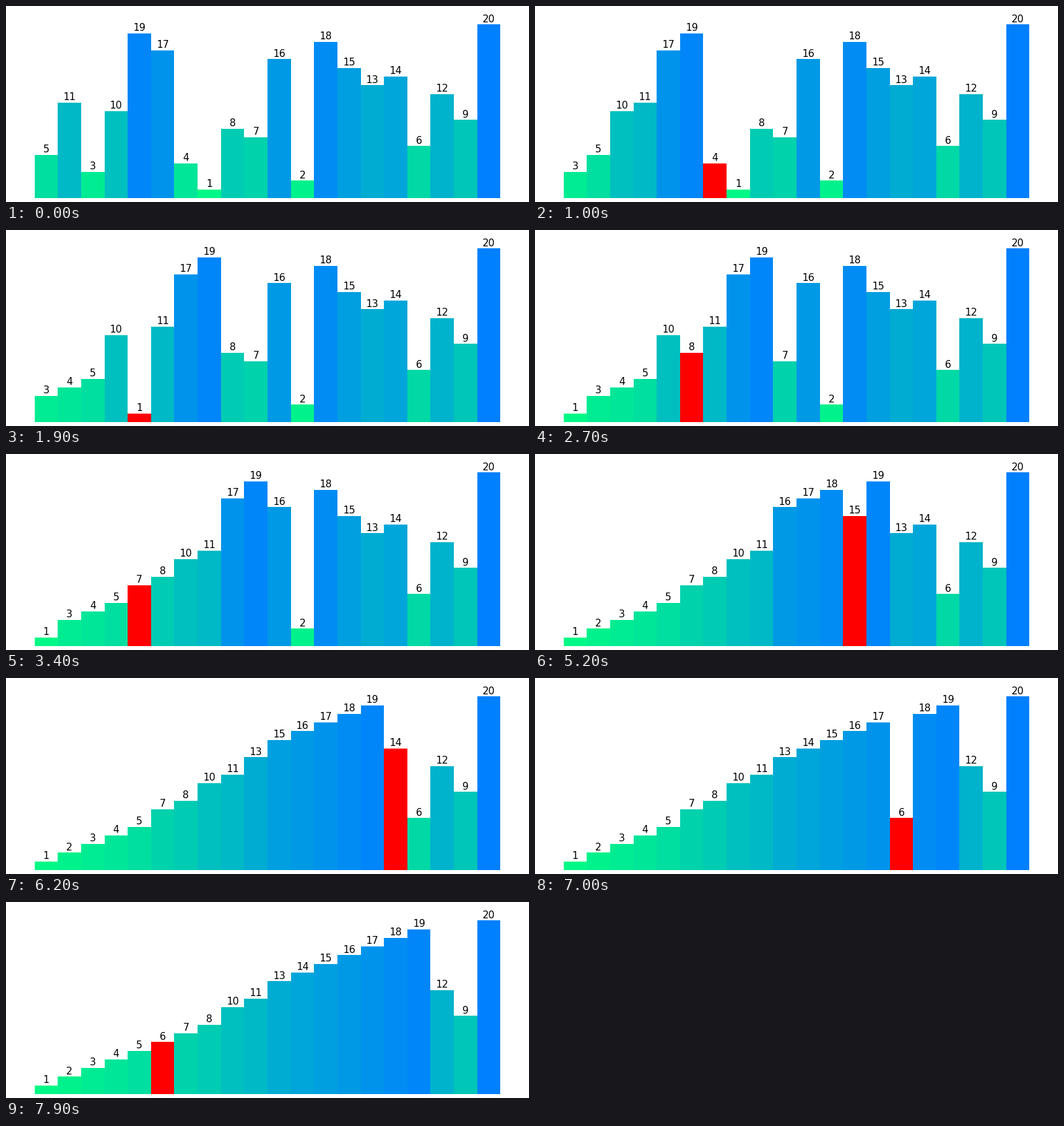
These frames come from a looping animation (800 px wide and 300 px high, 8 s). A matplotlib script:

```python
import matplotlib.pyplot as plt
from matplotlib.animation import FuncAnimation

START = [5, 11, 3, 10, 19, 17, 4, 1, 8, 7, 16, 2, 18, 15, 13, 14, 6, 12, 9, 20]
COUNT = len(START)
FRAMES = 80
INTERVAL = 100
LABEL_GAP = 0.05


def insertion_sort(values):
    """Yield (order, index of the moving bar) for every step."""
    order = list(values)
    yield list(order), None
    for i in range(1, len(order)):
        j = i
        yield list(order), j
        while j > 0 and order[j - 1] > order[j]:
            order[j - 1], order[j] = order[j], order[j - 1]
            j -= 1
            yield list(order), j


def shade(value):
    """Blend from spring green (low) to azure (high)."""
    half = value / COUNT / 2
    return (0, 1 - half, 0.5 + half)


steps = list(insertion_sort(START))[:FRAMES]

fig, ax = plt.subplots(figsize=(8, 3), dpi=100)
fig.subplots_adjust(left=0.01, right=0.99, bottom=0.02, top=0.95)
ax.axis("off")
bars = ax.bar(range(COUNT), START, width=1, align="edge")
labels = [ax.text(i + 0.5, v, "", ha="center", va="bottom", fontsize=11)
          for i, v in enumerate(START)]
ax.set_xlim(-1, COUNT + 1)
ax.set_ylim(0, COUNT * 1.05)


def draw(frame):
    order, active = steps[frame]
    for i, (bar, label, value) in enumerate(zip(bars, labels, order)):
        bar.set_height(value)
        bar.set_facecolor("red" if i == active else shade(value))
        label.set_y(value + LABEL_GAP)
        label.set_text(str(value))
    return [*bars, *labels]


anim = FuncAnimation(fig, draw, frames=FRAMES, interval=INTERVAL,
                     repeat=True, repeat_delay=0)
plt.show()
```
